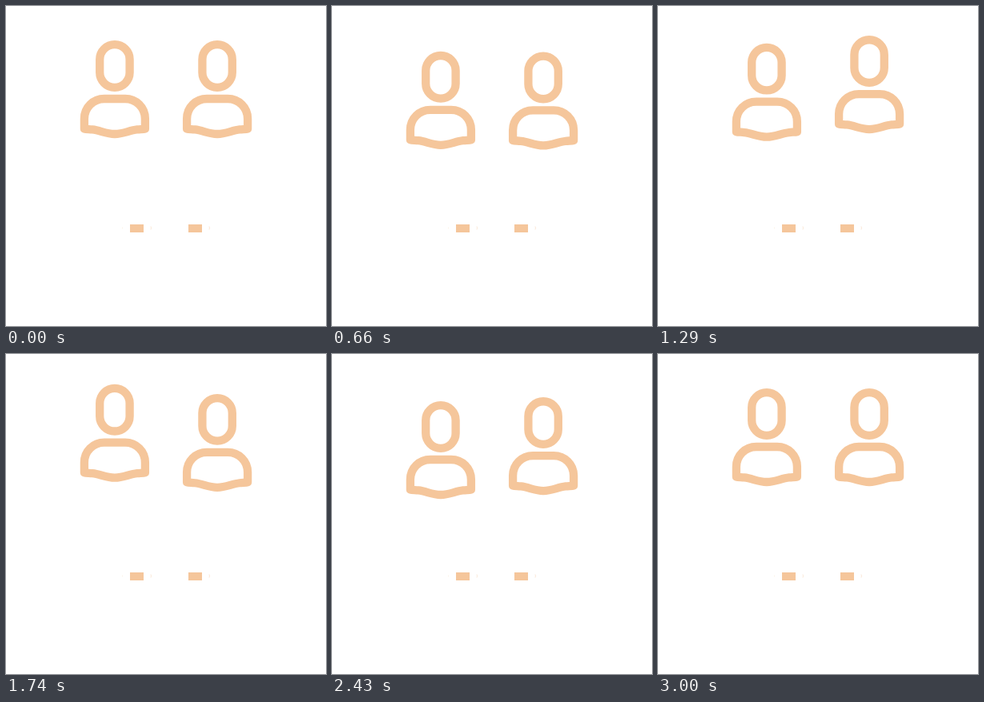
Animation of 400 by 400 pixels, one loop 5090 ms. Source, as an HTML page:

```html
<!DOCTYPE html>
<html lang="en">
<head>
<meta charset="utf-8">
<title>Bobbing people</title>
<style>
  html, body { margin: 0; width: 100%; height: 100%; overflow: hidden; background: #fff; }
  svg { display: block; width: 100%; height: 100%; }
  .person { fill: none; stroke: #f5c69b; stroke-width: 10.3; stroke-linejoin: round; }
  .dash { fill: #f5c69b; }
  .trace { fill: none; stroke: #f5c69b; stroke-opacity: .4; }
</style>
</head>
<body>
<svg viewBox="0 0 400 400">
  <defs>
    <!-- centred on x = 0 -->
    <g id="person">
      <rect x="-18.7" y="48.2" width="37.4" height="53.6" rx="18.7"/>
      <path d="M-38 153.5V141C-38 127-27 116-13 116H13C27 116 38 127 38 141V153.5
               C36 154 32 154 28 154.4C18 155.5 11 160 0 160C-11 160-18 155.5-28 154.4C-32 154-36 154-38 153.5Z"/>
    </g>
  </defs>
  <g class="person"><use id="left" href="#person"/><use id="right" href="#person"/></g>
  <g class="dash">
    <rect x="155" y="273" width="17" height="10"/>
    <rect x="228" y="273" width="17" height="10"/>
  </g>
  <path class="trace" d="M181 275.5q1 2 0 4M254 275.5q1 2 0 4"/>
  <path class="trace" stroke-width=".5" d="M145.5 276.5v2"/>
</svg>
<script>
  const LOOP = 5090, STEP = 30, MOVE_END = 3000;

  // [time in ms, vertical offset]
  const people = [
    { id: 'left', x: 135.9, keys: [[0, 0], [870, 16], [1650, -6], [2430, 16], [MOVE_END, 0]] },
    { id: 'right', x: 264.1, keys: [[0, 0], [525, 16], [1308, -6], [2088, 16], [MOVE_END, 0]] }
  ];
  for (const person of people) person.node = document.getElementById(person.id);

  const ease = p => (1 - Math.cos(Math.PI * p)) / 2;

  function offsetAt(keys, time) {
    const next = keys.findIndex(([at]) => at > time);
    if (next < 0) return keys[keys.length - 1][1];
    const [t0, y0] = keys[next - 1], [t1, y1] = keys[next];
    return y0 + (y1 - y0) * ease((time - t0) / (t1 - t0));
  }

  function draw(now) {
    const time = Math.floor((now % LOOP) / STEP) * STEP;
    for (const { node, x, keys } of people)
      node.setAttribute('transform', `translate(${x} ${offsetAt(keys, time).toFixed(2)})`);
  }

  let start;
  function tick(now) {
    start ??= now;
    draw(Math.max(0, now - start));
    requestAnimationFrame(tick);
  }
  draw(0);
  requestAnimationFrame(tick);
</script>
</body>
</html>
```
